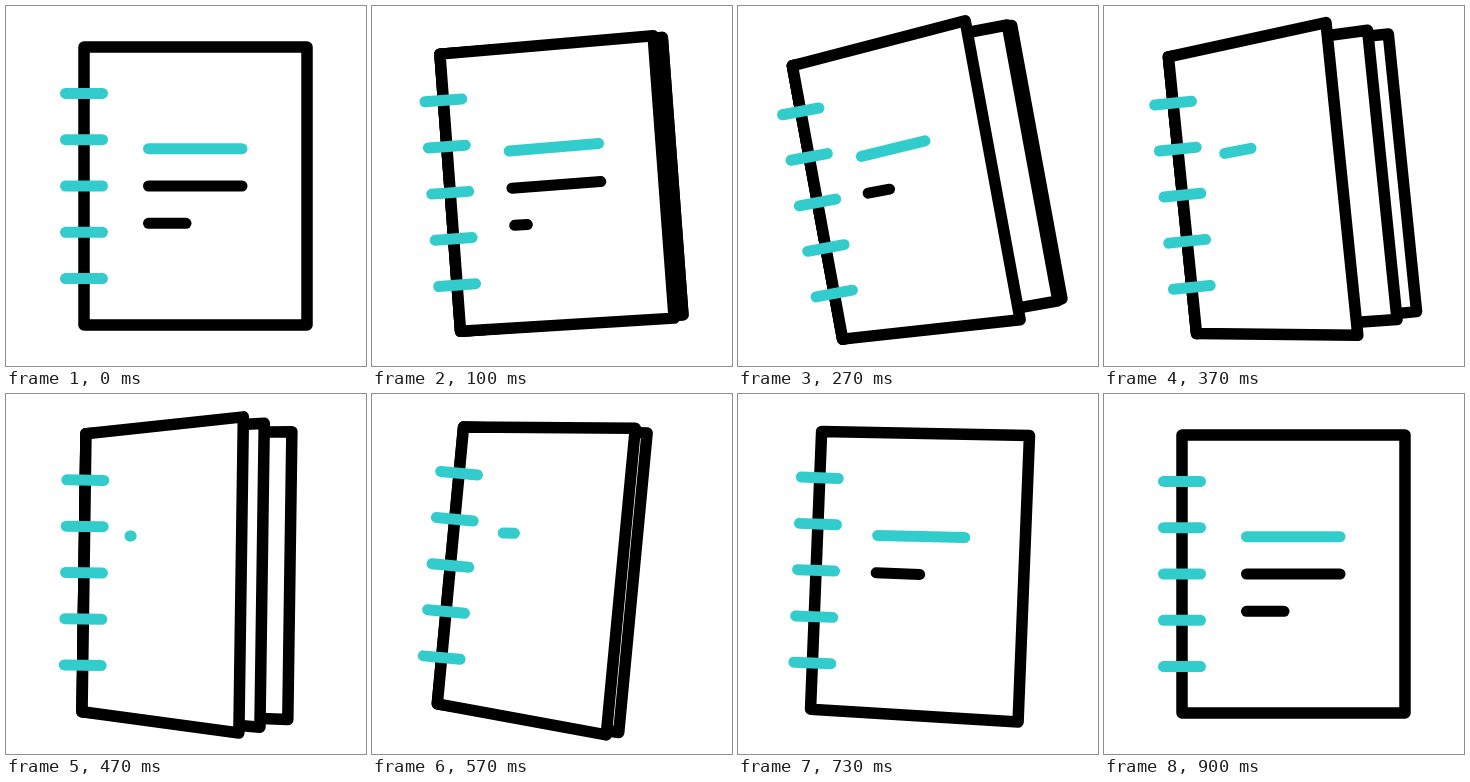
Write an HTML page with a canvas that moves like this. It is 360 by 360 pixels and loops after 1670 ms.

```html
<!DOCTYPE html>
<html lang="en">
<head>
<meta charset="utf-8">
<title>Notebook</title>
<style>
html, body { margin: 0; width: 100%; height: 100%; overflow: hidden; background: #fff; }
canvas { display: block; width: 100vmin; height: 100vmin; }
</style>
</head>
<body>
<canvas id="stage" width="360" height="360"></canvas>
<script>
const ctx = document.getElementById('stage').getContext('2d');
const LOOP = 1670, STEP = 100 / 3;
const W = 223, H = 278, LEFT = -91;
const BLACK = '#000', TEAL = '#33cccc';

// Eased interpolation through [step, value] keys
function track(keys, k) {
  if (k <= keys[0][0]) return keys[0][1];
  for (let i = 1; i < keys.length; i++) {
    const [a, from] = keys[i - 1], [b, to] = keys[i];
    if (k < b) {
      const x = (k - a) / (b - a);
      return from + (to - from) * x * x * (3 - 2 * x);
    }
  }
  return keys[keys.length - 1][1];
}

const TILT = [[0, 0], [7, -10.8], [18, 5.8], [25, 0]];
const COVER = [[0, W], [13, 156], [26, W]];
const MIDDLE = [[6, W], [19, 156]];
const BACK = [[9.7, W], [22.7, 156]];

const LINES = [
  { row: -1, end: 158, color: TEAL, trim: [[6.1, 1], [14.7, 0], [15.5, 0], [21.5, 1]] },
  { row: 0, end: 158, color: BLACK, trim: [[2.6, 1], [11, 0], [19, 0], [25, 1]] },
  { row: 1, end: 102, color: BLACK, trim: [[0, 1], [5, 0], [22, 0], [27, 1]] }
];

const rise = w => (W - w) * 0.29;

function line(x1, y1, x2, y2, color) {
  ctx.strokeStyle = color;
  ctx.lineWidth = 11;
  ctx.beginPath();
  ctx.moveTo(x1, y1);
  ctx.lineTo(x2, y2);
  ctx.stroke();
}

function page(w) {
  const h = H / 2, r = rise(w);
  ctx.beginPath();
  ctx.moveTo(LEFT, -h);
  ctx.lineTo(LEFT + w, -h - r);
  ctx.lineTo(LEFT + w, h + r);
  ctx.lineTo(LEFT, h);
  ctx.closePath();
  ctx.fillStyle = '#fff';
  ctx.fill();
  ctx.strokeStyle = BLACK;
  ctx.lineWidth = 11.5;
  ctx.stroke();
}

function writing(w, k) {
  const start = 64.5, scale = w / W;
  for (const { row, end, color, trim } of LINES) {
    const part = track(trim, k);
    if (part < 0.005) continue;
    const stop = start + (end - start) * part;
    const y = x => row * (37.3 + 0.8 * rise(w) * (x - start) / W);
    line(LEFT + start * scale, y(start), LEFT + stop * scale, y(stop), color);
  }
}

function draw(k) {
  ctx.setTransform(1, 0, 0, 1, 0, 0);
  ctx.fillStyle = '#fff';
  ctx.fillRect(0, 0, 360, 360);
  ctx.lineCap = ctx.lineJoin = 'round';
  ctx.translate(169, 180);
  ctx.rotate(track(TILT, k) * Math.PI / 180);

  const cover = track(COVER, k);
  for (const keys of [BACK, MIDDLE]) {
    const w = track(keys, k);
    if (w > cover) page(w);
  }
  page(cover);
  writing(cover, k);
  for (let i = -2; i <= 2; i++) {
    line(LEFT - 18.5, i * 46.3, LEFT + 18.5, i * 46.3, TEAL);
  }
}

function tick() {
  const t = performance.now() % LOOP;
  draw(Math.floor((t + 3.4) / STEP));
  requestAnimationFrame(tick);
}
tick();
</script>
</body>
</html>
```
